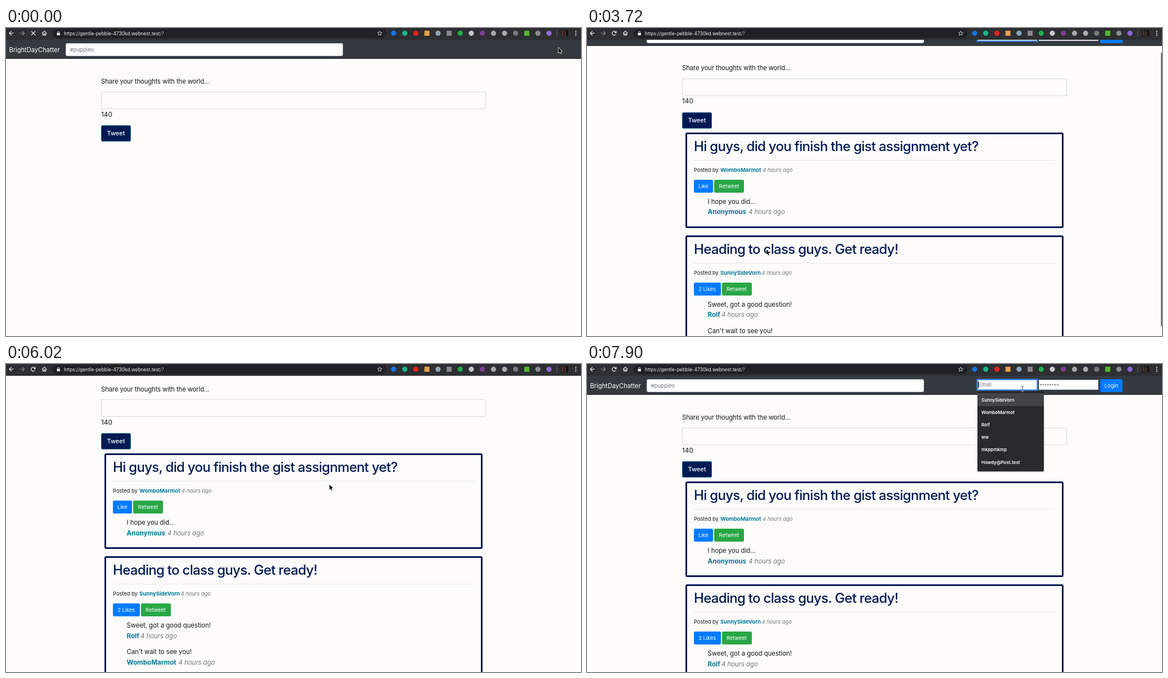
Animation, 1022 px wide and 548 px high, one loop 8 s. Source, as an HTML page with a canvas:

```html
<!DOCTYPE html>
<html lang="en">
<head>
<meta charset="utf-8">
<title>Feed</title>
<style>
  html, body { margin: 0; width: 100%; height: 100%; overflow: hidden; background: #fdfcfb; }
  #stage { position: relative; width: 1022px; height: 548px; overflow: hidden;
    font-family: Inter, "Open Sans", sans-serif; font-optical-sizing: none; color: #14171a; }
  #stage div { position: absolute; box-sizing: border-box; }
  #stage .label { white-space: pre; line-height: 20px; height: 20px; }
  #view { inset: 0; clip-path: inset(21px 0 0 0); background: #fdfcfb; }
  #page { left: 0; top: 0; width: 1022px; height: 640px; }
  canvas { position: absolute; left: 0; top: 0; width: 1022px; height: 548px; }
</style>
</head>
<body>
<div id="stage"><div id="view"><div id="page"></div></div></div>
<script>
const LOOP = 8000;
const NAVY = '#001a54', TEAL = '#057a9c', BLUE = '#007bff', GREEN = '#28a745';
const USERS = ['SunnySideVorn', 'WomboMarmot', 'Rolf', 'ww', 'mkppmkmp', 'Howdy@Post.test'];
const stage = document.getElementById('stage');
const page = document.getElementById('page');

// ---- building blocks ----
function box(parent, x, y, w, h, css = '') {
  const el = document.createElement('div');
  el.style.cssText = `left:${x}px;top:${y}px;width:${w}px;height:${h}px;${css}`;
  parent.append(el);
  return el;
}

// y is the middle of the capital letters
function label(parent, x, y, text, size, css = '') {
  const el = document.createElement('div');
  el.className = 'label';
  el.style.cssText = `left:${x}px;top:${y - 10}px;font-size:${size}px;${css}`;
  el.textContent = text;
  parent.append(el);
  return el;
}

function button(parent, x, y, w, h, text, size, color, css = '') {
  const el = box(parent, x, y, w, h, `background:${color};border-radius:2.5px;color:#fff;` +
    `font-size:${size}px;line-height:${h}px;text-align:center;white-space:pre;${css}`);
  el.textContent = text;
}

function byline(parent, x, y, name, timeX, size) {
  label(parent, x, y, name, size * 1.03, `font-weight:700;color:${TEAL}`);
  label(parent, timeX, y, '4 hours ago', size, 'font-style:italic;color:#707274');
}

function card(parent, top, height, post) {
  const el = box(parent, 0, top, 1022, height);
  box(el, 175, 0, 672, height, `border:3px solid ${NAVY};border-radius:3px`);
  label(el, 190, 25, post.title, 24, `font-weight:500;color:${NAVY};letter-spacing:-.029em`);
  box(el, 190, 49, 642, 1, 'background:#e6e6e6');
  label(el, 190, 67, 'Posted by', 9.3);
  byline(el, 237, 67, post.author, post.timeX, 9.3);
  button(el, 190, 84, post.likeW, 23, post.likes, 9.3, BLUE);
  button(el, 192 + post.likeW, 84, 53, 23, 'Retweet', 9.3, GREEN);
  post.comments.forEach(([text, name, timeX], i) => {
    const y = 123 + i * 47;
    label(el, 214.5, y, text, 11.3);
    byline(el, 214.5, y + 18.5, name, timeX, 11.3);
  });
}

// ---- page ----
box(page, 0, 21, 1022, 34, 'background:#343a40');
label(page, 5.5, 38.5, 'BrightDayChatter', 11.1, 'color:#fff');
box(page, 105.5, 26.5, 493, 23.5, 'background:#fff;border:1px solid #ced4da;border-radius:3px');
label(page, 113.5, 38.5, '#puppies', 9.6, 'color:#6c757d');
label(page, 169, 94.5, 'Share your thoughts with the world...', 11.3, 'letter-spacing:-.01em');
const compose = box(page, 169, 113, 684, 31, 'border:1px solid #d9d9d8');
label(page, 169, 153.7, '140', 11.9);
button(page, 169, 173, 53, 29, 'Tweet', 11, NAVY,
  'border:1px solid #17708c;line-height:27px;font-weight:500');

const login = box(page, 0, 0, 1022, 60);
const email = box(login, 693.5, 28, 106, 18, 'border:1px solid #bbb');
const emailText = label(login, 695.5, 37.3, 'Email', 9.3);
const caret = box(login, 695, 31, 1, 12, 'background:#000');
box(login, 802.5, 28, 106.5, 18, 'background:#fff;border:1px solid #ccc');
label(login, 804.5, 38.5, '********', 8.5, 'color:#6b6b6b');
button(login, 912, 26.5, 40, 23.5, 'Login', 9.3, BLUE);

const feed = box(page, 0, 0, 1022, 640);
card(feed, 209, 170, {
  title: 'Hi guys, did you finish the gist assignment yet?',
  author: USERS[1], timeX: 312, likes: 'Like', likeW: 34,
  comments: [['I hope you did...', 'Anonymous', 287]]
});
card(feed, 392, 217, {
  title: 'Heading to class guys. Get ready!',
  author: USERS[0], timeX: 310.5, likes: '2 Likes', likeW: 47.5,
  comments: [['Sweet, got a good question!', USERS[2], 239],
             ["Can't wait to see you!", USERS[1], 306.5]]
});

// ---- suggestions, scrollbar, toolbar ----
const menu = box(stage, 693.5, 48, 118.5, 142.5,
  'background:#292a2d;border-radius:2px;box-shadow:0 1px 2px rgba(0,0,0,.35);color:#fff');
const rows = USERS.map((name, i) => {
  const row = box(menu, 0, 4.4 + i * 22.2, 118.5, 22.2);
  label(row, 7.5, 11.3, name, 7.9, 'font-weight:600');
  return row;
});
const thumb = box(stage, 1020, 0, 2, 0, 'background:#717171;border-radius:1px');

box(stage, 0, 0, 1022, 21, 'background:#2d2f32');
box(stage, 83, 1, 593, 17, 'background:#202124;border-radius:9px');
const url = label(stage, 103, 9.5, 'https://gentle-pebble-4730kd.webnest.test', 8.35, 'color:#f1f1f1');
const query = document.createElement('span');
query.textContent = '/?';
query.style.color = '#b4b6b9';
url.append(query);

const canvas = document.createElement('canvas');
const ratio = window.devicePixelRatio || 1;
canvas.width = 1022 * ratio;
canvas.height = 548 * ratio;
stage.append(canvas);
const g = canvas.getContext('2d');

function line(color, width, ...pts) {
  g.strokeStyle = color;
  g.lineWidth = width;
  g.beginPath();
  for (let i = 0; i < pts.length; i += 2) g.lineTo(pts[i], pts[i + 1]);
  g.stroke();
}

function disc(x, y, r, color) {
  g.fillStyle = color;
  g.beginPath();
  g.arc(x, y, r, 0, 7);
  g.fill();
}

function rect(x, y, w, h, color) {
  g.fillStyle = color;
  g.fillRect(x, y, w, h);
}

const BADGES = ['#1677e8', '#15b981', '#e2231a', '#e8a04c', '#8ba7bd', '#85888c', '#1fae4b', '#c6c8ca',
  '#7d3c98', '#a6a8aa', '#a9abad', '#77797c', '#58b531', '#8c8e91', '#9467d8'];
const SQUARES = [3, 5, 12];

function toolbar(loading) {
  const white = '#eceded';
  line(white, 1.2, 13.5, 9.2, 6, 9.2);
  line(white, 1.2, 9.7, 5.4, 5.9, 9.2, 9.7, 13);
  line('#85888b', 1.2, 25, 9.2, 32.5, 9.2);
  line('#85888b', 1.2, 28.8, 5.4, 32.6, 9.2, 28.8, 13);
  if (loading) {
    line(white, 1.3, 45, 5.8, 52, 12.8);
    line(white, 1.3, 52, 5.8, 45, 12.8);
  } else {
    g.strokeStyle = white;
    g.lineWidth = 1.2;
    g.beginPath();
    g.arc(48.3, 9.3, 3.5, 0.5, 5.5);
    g.stroke();
    g.fillStyle = white;
    g.beginPath();
    g.moveTo(52.5, 5);
    g.lineTo(52.5, 8.9);
    g.lineTo(48.6, 8.9);
    g.fill();
  }
  line(white, 1.1, 64, 9.6, 68.2, 5.5, 72.4, 9.6);
  line(white, 1.1, 65.5, 8.8, 65.5, 13, 67.2, 13, 67.2, 10.3, 69.2, 10.3, 69.2, 13, 70.9, 13, 70.9, 8.8);

  rect(90.5, 8.6, 5.4, 4.4, white);
  g.strokeStyle = white;
  g.lineWidth = 0.9;
  g.beginPath();
  g.arc(93.2, 8, 1.6, Math.PI, 0);
  g.stroke();

  const star = [];
  for (let i = 0; i <= 10; i++) {
    const a = i * Math.PI / 5, r = i % 2 ? 1.9 : 4.3;
    star.push(664.3 + r * Math.sin(a), 9.5 - r * Math.cos(a));
  }
  line('#d5d6d7', 0.9, ...star);

  BADGES.forEach((color, i) => {
    const x = 689 + i * 19.72;
    if (SQUARES.includes(i)) rect(x - 4.5, 4.8, 9, 9, color);
    else disc(x, 9.3, 4.6, color);
  });
  rect(978.5, 4, 1, 11, '#65686b');
  rect(987, 4, 12, 11, '#17100f');
  rect(988, 5, 2.5, 9, '#6b3a32');
  disc(993.5, 7.5, 2, '#4b3a36');
  rect(991, 10, 5, 5, '#352a2a');
  for (const y of [5.8, 9.3, 12.8]) disc(1012.8, y, 1.1, white);
}

function pointer(x, y) {
  const arrow = [0, 0, 0, 9.2, 2.1, 7.3, 3.5, 10.5, 4.9, 9.9, 3.5, 6.8, 6.3, 6.5];
  g.beginPath();
  for (let i = 0; i < arrow.length; i += 2) g.lineTo(x + arrow[i], y + arrow[i + 1]);
  g.closePath();
  g.lineJoin = 'round';
  g.strokeStyle = '#fff';
  g.lineWidth = 1.5;
  g.stroke();
  g.fillStyle = '#000';
  g.fill();
  g.lineJoin = 'miter';
}

function beam(x, y) {
  for (const [color, width] of [['rgba(255,255,255,.8)', 2], ['#222', 0.9]]) {
    line(color, width, x, y - 4.2, x, y + 4.2);
    line(color, width, x - 1.8, y - 4.6, x, y - 4, x + 1.8, y - 4.6);
    line(color, width, x - 1.8, y + 4.6, x, y + 4, x + 1.8, y + 4.6);
  }
}

// ---- motion ----
// Each move: first step, last step, number of steps, then the place reached.
const CURSOR = [
  [150, 600, 4, 761, 130], [900, 900, 1, 761, 34], [1790, 1940, 2, 757, 80],
  [2530, 2530, 1, 681, 76], [2680, 3270, 5, 319, 394], [4460, 5120, 5, 267, 523],
  [5270, 5570, 3, 540, 245], [5870, 6380, 4, 763.5, 49.5], [6530, 6710, 2, 774, 44.5],
  [7760, 7760, 1, 774, 60], [7900, 7900, 1, 774, 44.5]
];
const SCROLL = [
  [3720, 3860, 2, 47], [4160, 4160, 1, 54], [4310, 4460, 2, 50],
  [6210, 6380, 2, -2.4], [6530, 6710, 2, 0]
];

function follow(moves, start, t) {
  let at = start;
  for (const [from, to, steps, ...goal] of moves) {
    if (t < from) break;
    const gap = steps > 1 ? (to - from) / (steps - 1) : 1;
    const p = Math.min(steps, Math.floor((t - from) / gap + 1e-6) + 1) / steps;
    const eased = p * p * (3 - 2 * p);
    at = at.map((v, i) => v + (goal[i] - v) * eased);
  }
  return at;
}

const during = (t, ...spans) => spans.some(([a, b]) => t >= a && t < b);
const show = (el, on) => { el.style.visibility = on ? 'visible' : 'hidden'; };
const inside = (x, y, l, t, r, b) => x >= l && x <= r && y >= t && y <= b;

function render(t) {
  const [x, y] = follow(CURSOR, [982, 35], t);
  const [scroll] = follow(SCROLL, [0], t);
  const loaded = t >= 300, focused = t >= 900;

  page.style.top = -scroll + 'px';
  show(login, loaded);
  show(feed, loaded);
  compose.style.boxShadow = during(t, [450, 900]) ? '0 0 0 2px #5b9ae8' : 'none';

  let pick = -1;
  if (during(t, [1790, 1940], [7760, LOOP])) pick = 0;
  if (during(t, [1940, 2680])) pick = 1;
  const preview = during(t, [1790, 2680]);
  emailText.textContent = preview ? USERS[pick] : 'Email';
  emailText.style.color = preview ? '#000' : '#757575';
  email.style.background = preview ? '#e8f0fe' : '#fff';
  email.style.boxShadow = focused ? '0 0 0 1.5px #3f82e4' : 'none';
  email.style.borderColor = focused ? '#6ba0ec' : '#ccc';
  show(caret, during(t, [900, 1500], [1790, 2230], [2680, 3270], [6530, 7310], [7760, LOOP]));

  show(menu, during(t, [900, 3720], [7010, LOOP]));
  rows.forEach((row, i) => { row.style.background = i === pick ? '#434447' : 'none'; });

  const top = 24 + Math.max(0, scroll) * 0.84;
  thumb.style.top = top + 'px';
  thumb.style.height = Math.min(547, 518 + scroll * 0.55) - top + 'px';
  show(thumb, during(t, [3720, 4960], [6210, 6710]));

  g.setTransform(ratio, 0, 0, ratio, 0, 0);
  g.clearRect(0, 0, 1022, 548);
  toolbar(!loaded);
  const py = y + scroll;
  const overText = inside(x, py, 169, 113, 853, 144) || (loaded && inside(x, py, 693, 28, 909, 46));
  (overText ? beam : pointer)(x, y);
}

function tick() {
  render(performance.now() % LOOP);
  requestAnimationFrame(tick);
}
tick();
</script>
</body>
</html>
```
